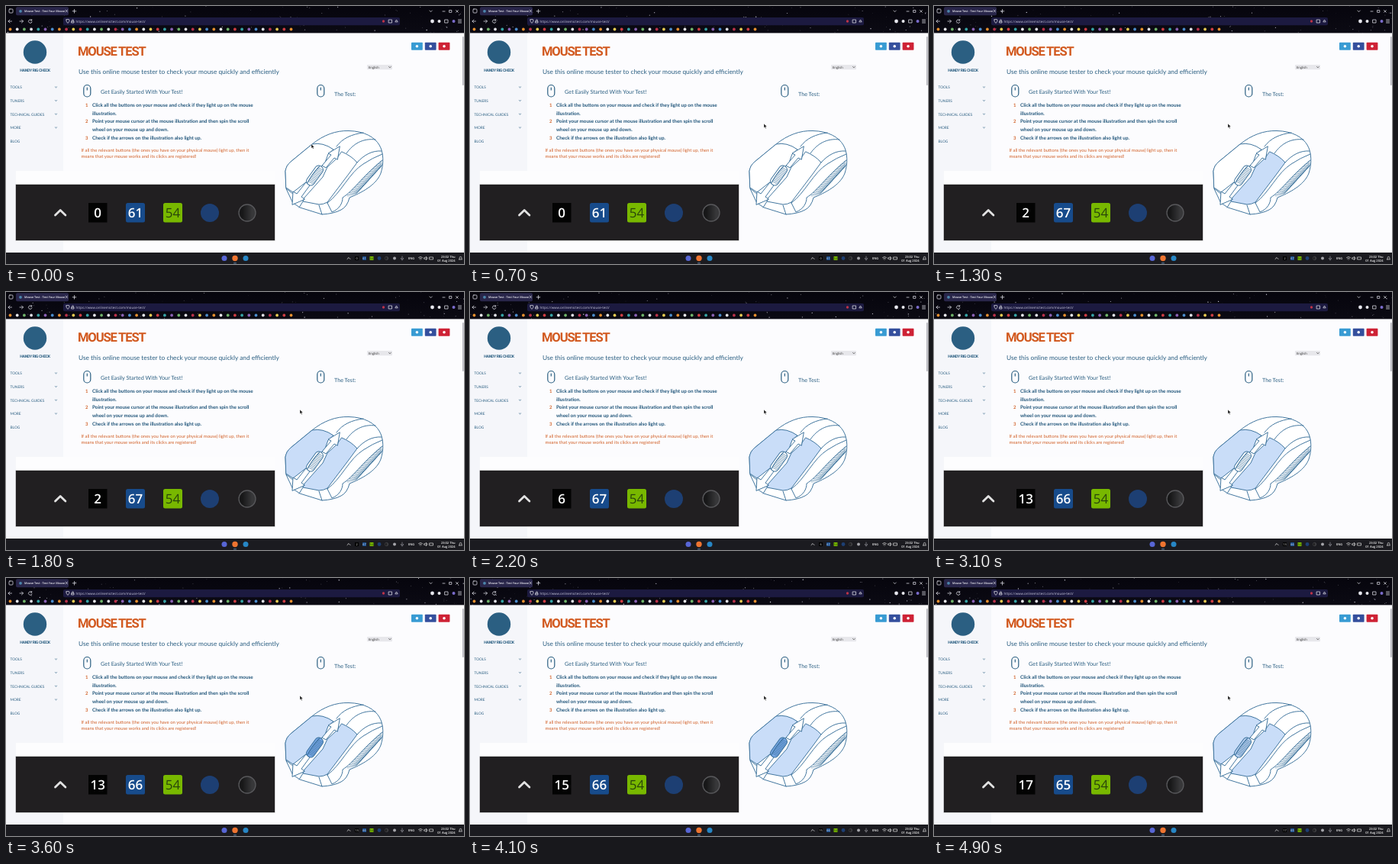
Animation, 600 px wide and 338 px high, one loop 5 s. Source, as an HTML page:

```html
<!DOCTYPE html>
<html lang="en">
<head>
<meta charset="utf-8">
<title>Mouse Test</title>
<style>
  html, body { margin: 0; width: 100%; height: 100%; overflow: hidden; background: #fcfcfe; }
  svg { display: block; width: 100vw; height: 100vh; }
  text { font-family: Lato, "Open Sans", sans-serif; text-rendering: geometricPrecision; }
  .ui { font-family: "Open Sans", "Noto Sans", sans-serif; }
  .narrow { font-family: Roboto, "Open Sans", sans-serif; letter-spacing: -.07em; }
  .digits { font-family: "Open Sans", "Noto Sans", sans-serif; text-anchor: middle; fill: #fff; }
  .line { fill: none; stroke-linecap: round; stroke-linejoin: round; }
</style>
</head>
<body>
<svg id="stage" viewBox="0 0 600 338" preserveAspectRatio="none">
  <defs>
    <clipPath id="gripClip"><path d="M441 251C455 242 466 224 492 202C495 216 486 232 463 244C454 248 448 250 441 251Z"/></clipPath>
    <clipPath id="headClip"><rect width="600" height="35.400"/></clipPath>
    <linearGradient id="head" x2="0" y2="1">
      <stop offset="0" stop-color="#06050d"/><stop offset="1" stop-color="#0b0a13"/>
    </linearGradient>
    <linearGradient id="ball">
      <stop offset=".2" stop-color="#171718"/><stop offset=".8" stop-color="#38383a"/>
    </linearGradient>
  </defs>

  <rect width="600" height="338" fill="#fcfcfe"/>
  <rect y="35" width="75" height="288" fill="#f5f6fa"/>
  <rect x="13" y="216" width="339" height="91" fill="#fdfdfe"/>
  <rect x="598" y="40" width="1.600" height="64" rx=".8" fill="#b0b0b7"/>

  <g id="browser">
    <rect width="600" height="35.400" fill="url(#head)"/>
    <g id="stars" clip-path="url(#headClip)"></g>
    <rect x="13" y="1.300" width="69" height="11" rx="2" fill="#29264a"/>
    <rect x="75" y="15" width="441" height="10.300" rx="2" fill="#1c1a40"/>
    <circle cx="19" cy="6.800" r="1.900" fill="#4c86ad"/>
    <g class="line" stroke="#d4d4dc" stroke-width=".8">
      <rect x="4" y="4" width="5" height="5" rx="1"/>
      <path d="M78 5.200l2.600 2.600m0-2.600l-2.600 2.600M89.500 4.500v4.600m-2.300-2.300h4.600"/>
      <path d="M7.500 20h-4.500m2-2l-2 2l2 2M18 20h4.500m-2-2l2 2l-2 2"/>
      <path d="M33.500 18.500a2.300 2.300 0 1 0 .5 2.300m-.3-3.300v1.500h-1.600"/>
      <path d="M555 6l1.600 1.600l1.600-1.600M572 7h3M581 5.500h2.800v2.800h-2.800zM589.500 5.500l2.800 2.800m0-2.800l-2.800 2.800"/>
      <path d="M79 18l2-.7l2 .7c0 2.500-.5 3.500-2 4.300c-1.500-.8-2-1.800-2-4.300zM86 20h3v2h-3zM86.500 20v-1.200a1 1 0 0 1 2 0v1.200"/>
      <path d="M501.500 18h4v4h-4zM510 20.500l1.500-2.500l1.500 2.500zM592.500 18h4m-4 2h4m-4 2h4"/>
      <rect x="575" y="18" width="4" height="4"/>
    </g>
    <circle cx="494.500" cy="20" r="1.700" fill="#bd3448"/>
    <circle cx="558.500" cy="20" r="2.400" fill="#e7e7ee"/>
    <circle cx="567.500" cy="20" r="2" fill="#e7e7ee"/>
    <circle cx="586.500" cy="20" r="2" fill="#7b6ccc"/>
    <text class="ui" x="24" y="8.400" font-size="3.750" font-weight="600" fill="#f1f1f6">Mouse Test - Test Your Mouse</text>
    <text class="ui" x="91.500" y="21.700" font-size="4.450" fill="#c9c9dc">https://www.onlinemictest.com/mouse-test/</text>
    <g id="bookmarks"></g>
  </g>

  <g id="sidebar" fill="#2b5f82">
    <circle cx="38" cy="60.500" r="15.200"/>
    <text class="narrow" x="38" y="86" font-size="5.200" font-weight="600" text-anchor="middle">HANDY RIG CHECK</text>
  </g>

  <g id="copy"></g>
  <g class="line" stroke="#2b5f82" stroke-width="1.200">
    <rect x="101.800" y="103.500" width="9" height="15.500" rx="4.500"/><path d="M106.300 107v3"/>
    <rect x="407.800" y="103.500" width="9" height="15.500" rx="4.500"/><path d="M412.300 107v3"/>
  </g>
  <rect x="473" y="77" width="33" height="6.300" rx="1" fill="#e7e7eb"/>
  <text class="ui" x="475" y="81.700" font-size="4.200" fill="#333">English</text>
  <path class="line" d="M501.500 79.400l1.400 1.500l1.400-1.500" stroke="#444" stroke-width=".7"/>
  <g id="social"></g>

  <g id="mouse" class="line" stroke="#39709a" stroke-width=".95">
    <path fill="#fff" d="M367 239L366 216Q367 209 373 204L401 181C416 169 432 163 449 163.500C470 164 483 172 489 182C495 192 495 207 491 219C486 232 472 242 450 251Q447 263 439 267Q430 272 414 273L385 264L376 258Z"/>
    <path id="left" d="M366 216Q367 209 373 204L401 181Q415 178 429 188L422 194L418 205L394 230L376 244L367 238Z"/>
    <path id="right" d="M440 191Q452 196 460 205L449 220L421 257Q416 260 410 260L389 256L391 251L415 224L421 211L433 200Z"/>
    <path d="M433 184C441 173 453 168 468 166M446 193C455 180 468 173 484 175M460 205C469 195 480 189 492 190"/>
    <path d="M367 239L377 247M389 256L384 264M410 261L414 273M421 258L427 270C437 266 441 258 441 251C455 242 466 224 493 202M421 258C439 245 450 218 468 207Q480 199 493 194"/>
    <g id="grip" clip-path="url(#gripClip)" stroke-width=".65"></g>
    <path fill="#fff" d="M437 184L422 193L426 195L414 209L419 212L430 199L434 201Z"/>
    <path fill="#fff" d="M375 260L376 243L381 246L393 231L398 235L387 250L391 253Z"/>
    <g transform="translate(404.500 222) rotate(36)">
      <rect id="wheel" x="-5.500" y="-14.500" width="11" height="29" rx="5"/>
      <path d="M-2 -13.500Q-4 0 -2 13.500"/>
      <path id="ridges" stroke-width=".6"/>
    </g>
  </g>

  <rect x="13" y="234" width="339" height="73" fill="#211f21" stroke="#211f21" stroke-opacity=".4"/>
  <path class="line" d="M64.500 274l6.700-6.500l6.700 6.500" stroke="#e2e2e2" stroke-width="2.800"/>
  <rect x="108" y="258" width="24.500" height="25.500" fill="#030303"/>
  <rect x="157" y="258" width="25" height="25.500" rx="2.500" fill="#174b8b"/>
  <rect x="206" y="258" width="25" height="25.500" rx="2.500" fill="#78b800"/>
  <circle cx="267" cy="271" r="12" fill="#1d3f73"/>
  <circle cx="316" cy="271" r="11" fill="url(#ball)" stroke="#58585b" stroke-width="1.300"/>
  <text id="count" class="digits" x="120.200" y="277.300" font-size="17" font-weight="600"></text>
  <text id="temp" class="digits" x="169.500" y="277.300" font-size="17" font-weight="600"></text>
  <text class="digits" x="218.500" y="277.300" font-size="17" style="fill:#29450b">54</text>

  <g id="taskbar">
    <rect y="323" width="600" height="15" fill="#1b1b20"/>
    <circle cx="286" cy="330.500" r="3.500" fill="#5866d5"/>
    <circle cx="300" cy="330.500" r="3.700" fill="#ef7430"/>
    <circle cx="314" cy="330.500" r="3.500" fill="#2786c5"/>
    <rect x="298" y="336.500" width="4" height=".8" rx=".4" fill="#78a9dd"/>
    <path class="line" d="M447 331.500l2-2l2 2" stroke="#ddd" stroke-width=".8"/>
    <rect x="457" y="328" width="5" height="5" fill="#000"/>
    <rect x="467" y="328" width="5" height="5" rx=".5" fill="#174b8b"/>
    <rect x="476.500" y="328" width="5" height="5" rx=".5" fill="#78b800"/>
    <circle cx="489" cy="330.500" r="2.400" fill="#1d3f73"/>
    <circle cx="498.500" cy="330.500" r="2.200" fill="url(#ball)" stroke="#66666a" stroke-width=".4"/>
    <circle cx="509" cy="330.500" r="2" fill="#a5a5aa"/>
    <path class="line" d="M519 328v3m-1.700-.6a1.700 1.700 0 0 0 3.400 0M519 332v1" stroke="#8c8c92" stroke-width=".8"/>
    <text id="miniCount" class="digits" x="459.500" y="332" font-size="3.800"></text>
    <text id="miniTemp" class="digits" x="469.500" y="332" font-size="3.800"></text>
    <text class="digits" x="479" y="332" font-size="3.800" style="fill:#29450b">54</text>
    <g fill="#f4f4f4" font-size="4" font-weight="600">
      <text class="ui" x="527" y="332">ENG</text>
      <text class="ui" x="588.500" y="329.500" text-anchor="end">23:02 Thu</text>
      <text class="ui" x="588.500" y="335" text-anchor="end">01 Aug 2024</text>
    </g>
    <path class="line" d="M540.500 329.500q2.500-2.300 5 0m-3.900 1.400q1.400-1.200 2.800 0m-1.400 1.200v.1M548 329.800h1l1.500-1.500v4.500l-1.500-1.500h-1zM551.700 329.300q1 1.200 0 2.400M555 329h4.500v3h-4.500zM593.500 332h4l-.7-1v-1.300a1.300 1.300 0 0 0-2.600 0v1.300z" stroke="#ddd" stroke-width=".7"/>
  </g>

  <path id="pointer" d="M0 0v5.300l1.300-1.100l.9 2l.9-.4l-.9-1.900h1.700z" fill="#111" stroke="#fff" stroke-width=".35"/>
</svg>

<script>
const LOOP = 5000, STEP = 100;
const $ = id => document.getElementById(id);

function add(parent, tag, attrs, content) {
  const el = document.createElementNS("http://www.w3.org/2000/svg", tag);
  for (const key in attrs) el.setAttribute(key, attrs[key]);
  if (content) el.textContent = content;
  parent.appendChild(el);
  return el;
}

function seeded(seed) {
  return () => (seed = (seed * 16807) % 2147483647) / 2147483647;
}

const blue = "#2b5f82", navy = "#1f5479", orange = "#d2622a";
function write(x, y, size, fill, content, weight = 400) {
  return add($("copy"), "text", { x, y, "font-size": size, fill, "font-weight": weight }, content);
}

function buildCopy() {
  write(94, 64.6, 16.6, "#d2591f", "MOUSE TEST", 700).setAttribute("class", "narrow");
  write(95, 89.2, 8.34, blue, "Use this online mouse tester to check your mouse quickly and efficiently");
  write(124, 115.2, 7.32, blue, "Get Easily Started With Your Test!");
  write(430, 117.6, 7.2, blue, "The Test:");
  [
    "Click all the buttons on your mouse and check if they light up on the mouse",
    "illustration.",
    "Point your mouse cursor at the mouse illustration and then spin the scroll",
    "wheel on your mouse up and down.",
    "Check if the arrows on the illustration also light up."
  ].forEach((row, i) => {
    const y = 132.1 + i * 10.65;
    write(113, y, 6.35, navy, row, 700);
    if (i % 2 === 0) write(104, y, 6, orange, String(i / 2 + 1), 700);
  });
  write(98.5, 190.6, 5.95, orange, "If all the relevant buttons (the ones you have on your physical mouse) light up, then it");
  write(98.5, 199.2, 5.95, orange, "means that your mouse works and its clicks are registered!");
}

function buildSidebar() {
  ["TOOLS", "TUNERS", "TECHNICAL GUIDES", "MORE", "BLOG"].forEach((label, i) => {
    const y = 108.3 + i * 17.65;
    add($("sidebar"), "text", { x: 5.5, y, "font-size": 4.8 }, label);
    if (i < 4) add($("sidebar"), "path", {
      class: "line", d: `M64.300 ${y - 2.5}l1.200 1.100l1.200-1.100`, stroke: blue, "stroke-width": .7
    });
  });
}

function buildIcons() {
  ["#389bd3", "#344f9d", "#ce2235"].forEach((fill, i) => {
    const x = 531 + i * 17.8;
    add($("social"), "rect", { x, y: 47.8, width: 14.8, height: 10, rx: .8, fill });
    add($("social"), "circle", { cx: x + 7.4, cy: 52.8, r: 1.8, fill: "#fff" });
  });
  const tints = ["#e58e2e", "#dedee5", "#ce3d43", "#4b8ccc", "#6fb36a", "#e7ca52", "#8a61b4", "#e6e6ea", "#b9314a", "#36a3a5"];
  for (let i = 0; i < 41; i++) {
    add($("bookmarks"), "circle", { cx: 5.5 + i * 9.2, cy: 30.5, r: 1.9, fill: tints[(i * 7 + (i >> 2)) % tints.length] });
  }
}

function buildMouse() {
  for (let i = 0; i < 18; i++) {
    add($("grip"), "path", { d: `M${438 + i * 3} ${258 - i * 3.3}q16-4 28-20` });
  }
  let ridges = "";
  for (let y = -11; y <= 11; y += 2) ridges += `M-2.500 ${y}l7.500-.8`;
  $("ridges").setAttribute("d", ridges);
}

const rand = seeded(82);
const stars = Array.from({ length: 120 }, () => ({
  x: rand() * 600, y: rand() * 36, speed: 1 + Math.floor(rand() * 3), phase: rand() * 2 * Math.PI,
  el: add($("stars"), "circle", { r: .2 + rand() * .5, fill: "#e6e5f3" })
}));

// Tray readings refresh about once a second: [time, clicks, temperature].
const readings = [[0, 0, 61], [1000, 2, 67], [2000, 6, 67], [2900, 13, 66], [3900, 15, 66], [4800, 17, 65]];
const lit = "#c9ddf8";
const ease = p => p * p * (3 - 2 * p);

function draw(time) {
  const t = Math.floor((time % LOOP) / STEP) * STEP;
  const turn = t / LOOP * 2 * Math.PI;

  for (const s of stars) {
    s.el.setAttribute("cx", s.x + 2 * Math.sin(turn + s.phase));
    s.el.setAttribute("cy", s.y + Math.cos(turn + s.phase));
    s.el.setAttribute("opacity", .55 + .4 * Math.sin(turn * s.speed + s.phase));
  }

  const p = ease(Math.min(1, t / 500));
  $("pointer").setAttribute("transform", `translate(${400 - 15 * p} ${181 - 26.800 * p})`);

  const [, clicks, heat] = readings.filter(r => r[0] <= t).pop();
  for (const id of ["count", "miniCount"]) $(id).textContent = clicks;
  for (const id of ["temp", "miniTemp"]) $(id).textContent = heat;

  $("right").setAttribute("fill", t >= 800 ? lit : "#fff");
  $("left").setAttribute("fill", t >= 1600 ? lit : "#fff");
  $("wheel").setAttribute("fill", t < 3500 ? "#fff" : t < 4500 ? "#74a4e2" : "#b7d0f0");
}

buildCopy();
buildSidebar();
buildIcons();
buildMouse();

function tick() {
  draw(performance.now());
  requestAnimationFrame(tick);
}
tick();
</script>
</body>
</html>
```
